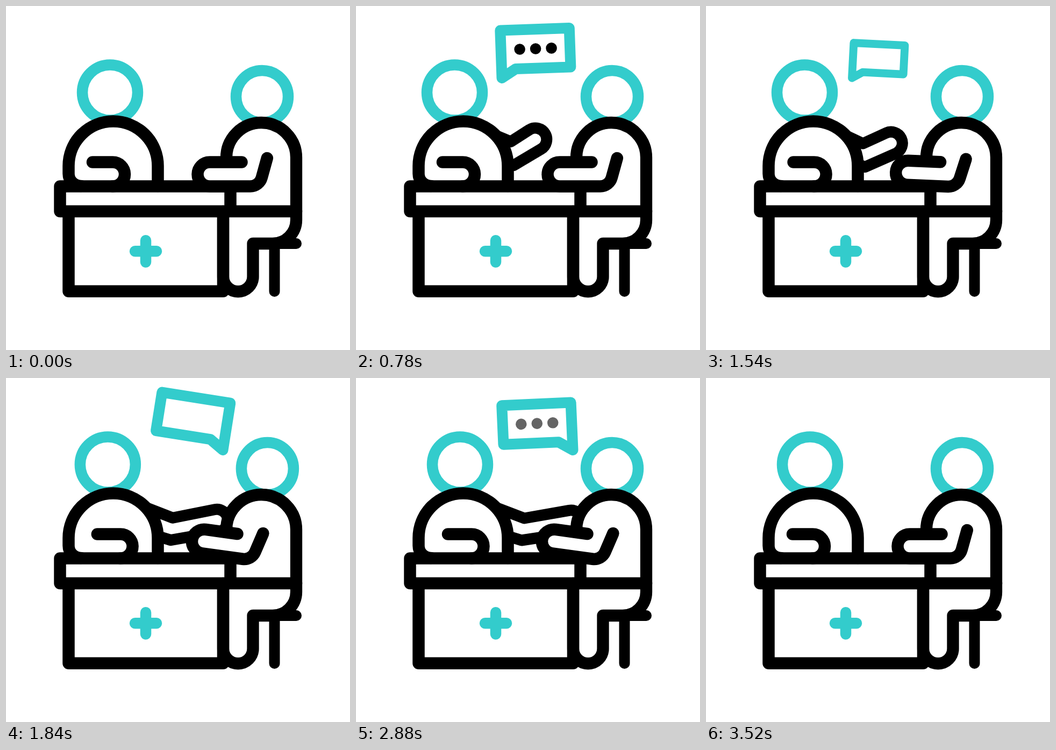
An HTML page for the animation above (3600 ms loop, 640 px wide and 640 px high).

```html
<!DOCTYPE html>
<html lang="en">
<head>
<meta charset="utf-8">
<title>Consultation</title>
<style>
html, body { margin: 0; width: 100%; height: 100%; overflow: hidden; background: #fff; }
svg { display: block; width: 100vw; height: 100vh; }
path, circle { stroke-linecap: round; stroke-linejoin: round; }
.ink { fill: none; stroke: #000; stroke-width: 22.5; }
.solid { fill: #fff; stroke: #000; stroke-width: 22.5; }
.teal { fill: none; stroke: #33cccc; stroke-width: 20.5; }
</style>
</head>
<body>
<svg viewBox="0 0 640 640">
  <circle id="headL" class="teal" cx="193.5" cy="161" r="51.5"/>
  <circle id="headR" class="teal" cx="476.5" cy="168.5" r="48.5"/>
  <path id="reach" class="solid" style="stroke-width:21"/>

  <!-- doctor -->
  <path class="solid" d="M139.5 335A23 23 0 0 1 116.5 312V297.5A83 83 0 0 1 282.5 297.5V335"/>
  <path id="fold" class="ink"/>

  <!-- patient and stool -->
  <path class="ink" style="stroke-width:20" d="M465 442H540M499.5 442V531"/>
  <path class="solid" style="stroke-width:22.3" d="M410 282a65 65 0 0 1 130 0V398a44 44 0 0 1 -44 44H459.5V503.5a27.75 27.75 0 0 1 -55.5 0V382"/>

  <!-- desk -->
  <path class="ink" d="M100.5 335.5H417.5V382H100.5ZM417.5 382H540M116.5 382V530.7H404V382"/>
  <path class="teal" d="M240 456.3H280M260 436.3V476.5"/>

  <path id="armR" class="solid" d="M438.5 290.5H379a22.5 22.5 0 0 0 0 45H454.5A22 22 0 0 0 475.7 319.5L485.8 283"/>

  <g id="talkL"></g>
  <g id="talkR"></g>
</svg>
<script>
const LOOP = 3600, STEP = 20;
const $ = id => document.getElementById(id);
const mix = (a, b, p) => a + (b - a) * p;
const clamp = x => Math.max(0, Math.min(1, x));
const ramp = (t, a, b) => clamp((t - a) / (b - a));
const ease = (t, a, b) => { const p = ramp(t, a, b); return p * p * (3 - 2 * p); };

// eased track through [time, value] keys; values may be arrays
function track(keys, t) {
  let i = 0;
  while (i < keys.length - 2 && t >= keys[i + 1][0]) i++;
  const [t0, a] = keys[i], [t1, b] = keys[i + 1];
  const p = ease(t, t0, t1);
  return Array.isArray(a) ? a.map((v, k) => mix(v, b[k], p)) : mix(a, b, p);
}

// reaching arm: hand x, y, tilt, elbow x, y, underarm x, y
const HIDDEN = [240, 280, -32, 246, 262, 250, 292];
const RAISED = [333.5, 243.5, -32, 288, 250, 293, 294];
const LOWERED = [334, 253, -29, 288, 255, 294, 299];
const SHAKE = [400, 267, -9.5, 313, 261, 308, 302];
const REACH = [[20, HIDDEN], [400, RAISED], [460, RAISED], [1120, LOWERED],
  [1400, LOWERED], [1960, SHAKE], [2940, SHAKE], [3440, HIDDEN]];
const HEAD_L = [[20, 193.5], [400, 183.5], [1640, 183.5], [2000, 193.5]];
const HEAD_R = [[1600, 476.5], [1940, 489], [2140, 489], [2380, 476.5]];

function reachPath([x, y, tilt, ex, ey, ux, uy]) {
  const a = tilt * Math.PI / 180, r = 21;
  const nx = r * Math.sin(a), ny = -r * Math.cos(a);
  return `M258 240L${ex} ${ey}L${x + nx} ${y + ny}` +
    `A${r} ${r} 0 0 1 ${x - nx} ${y - ny}L${ux} ${uy}L272 291`;
}

// speech bubble drawn from its tail tip; dir is -1 for the flipped one
function makeBubble(id, dir) {
  const dots = [35, 64.5, 94].map(x => `<circle cx="${x * dir}" cy="-52.3" r="10.3"/>`).join("");
  $(id).innerHTML =
    `<path class="teal" style="stroke-width:20" d="M0 0L0 -88.5H${128.5 * dir}V-16H${26 * dir}Z"/><g>${dots}</g>`;
}

function sway(t) {
  const first = t < 490 ? 2 : 1;
  return 5.5 * first * Math.cos(2 * Math.PI * (t - 325) / 660);
}

function drawBubble(id, x, t, fadeAt, outAt, outLen) {
  const g = $(id);
  const size = ease(t, 160, 310) * (1 - ease(t, outAt, outAt + outLen));
  g.style.display = size > 0.01 ? "" : "none";
  g.setAttribute("transform", `translate(${x} 134) rotate(${sway(t)}) scale(${size})`);
  g.lastChild.setAttribute("opacity", ramp(t, 480, 680) * (1 - ramp(t, fadeAt, fadeAt + 200)));
}

function draw(t) {
  $("headL").setAttribute("cx", track(HEAD_L, t));
  $("headR").setAttribute("cx", track(HEAD_R, t));
  $("reach").setAttribute("d", reachPath(track(REACH, t)));

  const f = ease(t, 1400, 1960) * (1 - ease(t, 2940, 3440));
  $("fold").setAttribute("d", `M${161 + 10 * f} 290.5H${198.5 + 16.5 * f}a22.5 22.5 0 0 1 0 45`);

  const s = ease(t, 1400, 1780) * (1 - ease(t, 2940, 3440));
  $("armR").setAttribute("transform", `translate(${-8 * s} ${-0.5 * s}) rotate(${7.8 * s} 438.5 290.5)`);

  drawBubble("talkL", 271.5, t, 1080, 1480, 180);
  drawBubble("talkR", 403.5, t - 1450, 1350, 1700, 220);
}

makeBubble("talkL", 1);
makeBubble("talkR", -1);

const start = performance.now();
function tick() {
  const t = (performance.now() - start) % LOOP;
  draw(Math.min(3520, Math.floor(t / STEP) * STEP));
  requestAnimationFrame(tick);
}
draw(0);
requestAnimationFrame(tick);
</script>
</body>
</html>
```
